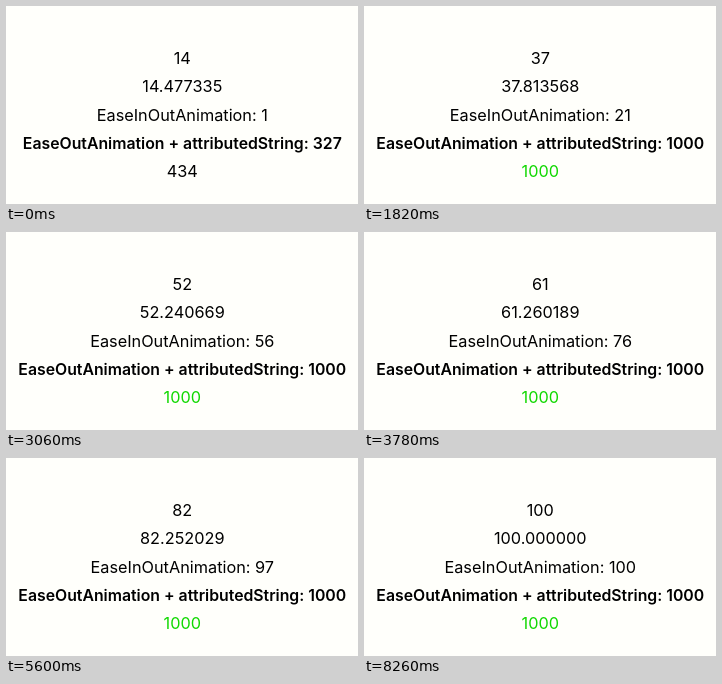
An HTML page that plays this animation: 352x198 px, repeating every 9040 ms.

```html
<!DOCTYPE html>
<html>
<head>
<meta charset="utf-8">
<style>
html, body { margin: 0; width: 100%; height: 100%; overflow: hidden; background: #fffffb; }
svg { display: block; width: 352px; height: 198px; }
text { font: 16.3px Inter, Roboto, sans-serif; text-anchor: middle; fill: #000; }
.bold { font-size: 15.8px; font-weight: 600; }
.done { fill: #10d800; }
</style>
</head>
<body>
<svg viewBox="0 0 352 198">
  <text x="176.3" y="58"/>
  <text x="176.3" y="86"/>
  <text x="176.3" y="115"/>
  <text x="176.3" y="143" class="bold"/>
  <text x="176.3" y="171"/>
</svg>
<script>
const LOOP = 9040;
const CYCLE = 980, ACTIVE = 880, LEAD = 160, STEP = 20;
const rows = document.querySelectorAll('text');

// key points of the almost linear percentage: ms, value
const keys = [[0, 14.477335], [860, 25.566568], [1820, 37.813568], [3060, 52.240669],
  [4480, 70.029167], [5600, 82.252029], [7120, 100]];

function percentAt(t) {
  const i = keys.findIndex(k => k[0] > t);
  if (i < 0) return 100;
  const [t0, v0] = keys[i - 1], [t1, v1] = keys[i];
  return v0 + (v1 - v0) * (t - t0) / (t1 - t0);
}

// counting advances in steps and pauses briefly at the end of each cycle
function stepped(time) {
  const t = Math.floor(time / STEP) * STEP + LEAD;
  const inCycle = t % CYCLE;
  return t - inCycle + Math.min(inCycle, ACTIVE) - LEAD;
}

const easeInOut = p => p < 0.5 ? 4 * p ** 3 : 1 - 4 * (1 - p) ** 3;

function draw(time) {
  const v = percentAt(stepped(time)), p = v / 100, fast = Math.min(1, p * 3);
  const lines = [
    Math.floor(v),
    v.toFixed(6),
    'EaseInOutAnimation: ' + Math.floor(100 * easeInOut(p)),
    'EaseOutAnimation + attributedString: ' + Math.floor(1000 * easeInOut(fast)),
    Math.round(1000 * fast)
  ];
  lines.forEach((s, i) => rows[i].textContent = s);
  rows[4].classList.toggle('done', fast === 1);
}

const start = performance.now();
function tick() {
  draw((performance.now() - start) % LOOP);
  requestAnimationFrame(tick);
}
tick();
</script>
</body>
</html>
```
